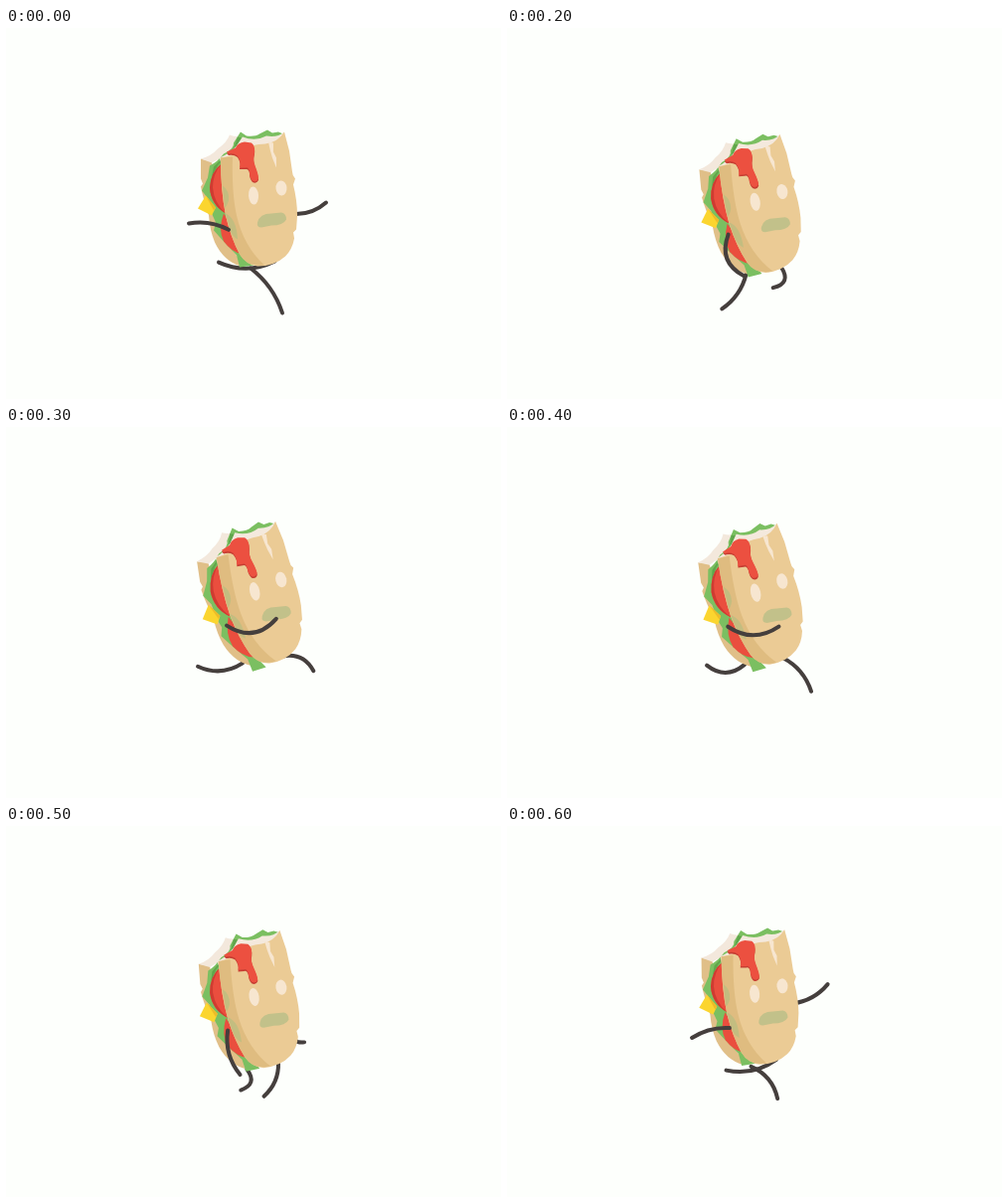
Write an HTML page with a canvas that moves like this. It is 498x373 px and loops after 0.65 s.

```html
<!DOCTYPE html>
<html lang="en">
<head>
<meta charset="utf-8">
<title>Running sandwich</title>
<style>
  html, body { margin: 0; width: 100%; height: 100%; overflow: hidden; background: #fdfffc; }
  canvas { display: block; width: 498px; height: 373px; }
</style>
</head>
<body>
<canvas id="stage" width="498" height="373"></canvas>
<script>
const ctx = document.getElementById('stage').getContext('2d');
const LOOP = 650, STEP = 50;
const PIVOT = { x: 245, y: 163 };

const SHAPES = {
  backBread: 'M196 133L207 136L214 190Q222 226 242 239L236 241Q219 236 210 217Q205 205 204 190Q198 172 196 161L198 158L196 153Z',
  backTop: 'M196 133Q207 130 213 123Q222 117 225 109Q232 112 239 110L231 125L207 137Z',
  lettuce: 'M236 106L242 110Q251 111 255 108L263 104L268 107L274 106L279 108L265 125L232 140L236 223L249 240L235 242L232 230L217 214L209 205L211 197L207 188L204 174L197 165L203 152L205 140Q213 136 219 128Q230 123 229 117Z',
  lettuceShade: 'M233 111L237 112L231 122L220 131L213 140L207 151L209 141Q222 128 229 123Z',
  cheese: 'M193 183L201 170L211 182L207 190Z',
  cheeseShade: 'M201 170L211 182L209 185Z',
  tomatoTop: 'M217 138Q206 146 205 162Q206 179 221 188Z',
  tomatoTopShade: 'M217 138Q206 146 205 162Q206 179 221 188Q209 177 208 162Q208 148 217 138Z',
  tomatoLow: 'M219 188Q213 204 219 216Q227 227 238 229L227 201Z',
  frontTop: 'M215 132Q226 127 232 120L238 111Q251 116 262 110Q273 112 280 106L284 124L217 141Z',
  face: 'M216 132Q229 130 236 125Q247 118 261 118Q274 116 280 106L285 125L288 146Q288 150 291 153L289 159Q293 175 293 190L292 204L289 207L290 213Q288 224 281 231Q270 241 253 241Q242 240 235 229Q226 212 221 190Q216 165 216 132Z',
  faceSide: 'M216 132L228 131Q227 168 232 190Q239 221 260 240Q242 242 235 229Q226 212 221 190Q216 165 216 132Z',
  moldTop: 'M218 160Q225 165 224 175Q222 181 220 182Z',
  moldLow: 'M221 188Q232 193 233 214Q227 211 225 203Z',
  mouth: 'M253 197Q255 188 267 188L277 187Q282 188 282 194Q279 200 267 200L257 202Q252 202 253 197Z',
  crack: 'M264 116L269 117L269 126L272 132L272 142L268 132L266 125Z',
  sauce: 'M222 126L231 122Q233 117 240 116L247 117Q251 120 250 127Q248 134 251 141Q254 149 254 153Q252 157 248 155Q245 152 245 146Q244 141 241 142L235 142Q237 136 233 130Q229 127 224 128Z'
};
for (const name in SHAPES) SHAPES[name] = new Path2D(SHAPES[name]);

// mean plus cosine and sine parts of the first, second, ... harmonic
function wave(phase, mean, ...parts) {
  return parts.reduce((sum, amp, i) => {
    const angle = phase * (1 + (i >> 1));
    return sum + amp * (i % 2 ? Math.sin(angle) : Math.cos(angle));
  }, mean);
}

// arc from (ax, ay) to (bx, by) whose middle lies `bend` off the chord
function limb(ax, ay, bx, by, bend) {
  const dx = bx - ax, dy = by - ay, k = 2 * bend / Math.hypot(dx, dy);
  ctx.beginPath();
  ctx.moveTo(ax, ay);
  ctx.quadraticCurveTo((ax + bx) / 2 - dy * k, (ay + by) / 2 + dx * k, bx, by);
  ctx.stroke();
}

function farArm(p) {
  const x = wave(p, 287, 40, -3, -5, -2);
  const y = Math.min(222, wave(p, 214, -33, -10, -5.5, 33));
  limb(287, 99 + y / 2, x, y, 4);
}

function nearArm(p, bob) {
  const x = wave(p, 228, -50, -12, 0, 0, 6, 4);
  const y = wave(p, 218, 3.5, 0, -29, -12, 4, 2);
  limb(wave(p, 223, 1), 204 + bob * .8, x, y, wave(p, 7, -3.5, 1.5));
}

function farLeg(p, bob) {
  const x = wave(p, 261, -50, -8, 3, 2);
  const y = wave(p, 254, -7.4, -8.2, -13, 0, 2, -1.5);
  limb(wave(p, 274.5, -4), 236 + bob, x, y, wave(p, -6.2, -.5, -2));
}

function nearLeg(p, bob) {
  const x = wave(p, 233, 43, 0, 2);
  const y = wave(p, 268, 23, 15, -8.5, 0, 4, 3);
  limb(wave(p, 242, 4), 243 + bob, x, y, wave(p, -5.5, 1.2, 2));
}

function fill(name, color) {
  ctx.fillStyle = color;
  ctx.fill(SHAPES[name]);
}

// run a drawing inside its own transform
function within(change, paint) {
  ctx.save();
  change();
  paint();
  ctx.restore();
}

function stretch(y, factor) {
  ctx.translate(0, y);
  ctx.scale(1, factor);
  ctx.translate(0, -y);
}

function turn(x, y, angle) {
  ctx.translate(x, y);
  ctx.rotate(angle);
  ctx.translate(-x, -y);
}

function eye(x, y, rx, ry) {
  ctx.beginPath();
  ctx.ellipse(x, y, rx, ry, -.08, 0, 2 * Math.PI);
  ctx.fill();
}

function filling(sag) {
  within(() => stretch(104, 1 + sag / 270), () => {
    fill('lettuce', '#7bbf61');
    fill('lettuceShade', '#60a64c');
    fill('tomatoTop', '#ea4e3e');
    fill('tomatoTopShade', '#cf3b31');
    fill('tomatoLow', '#ea4e3e');
  });
  within(() => ctx.translate(0, sag * .75), () => {
    fill('cheese', '#fbd52f');
    fill('cheeseShade', '#ecbb29');
  });
}

function face(tilt) {
  fill('frontTop', '#f4e9dd');
  fill('face', '#ebcb95');
  fill('faceSide', '#dfbc80');
  fill('moldTop', '#c3bd80');
  fill('moldLow', '#c3bd80');
  fill('crack', '#f7e6d0');
  within(() => turn(267, 194, -tilt), () => fill('mouth', '#c2c18a'));
  eye(249, 170, 5, 9);
  eye(277, 162.5, 5.5, 7.5);
  within(() => ctx.translate(0, 1.6), () => fill('sauce', '#c73d32'));
  fill('sauce', '#ec5040');
}

function sandwich(p, bob) {
  const lean = (1 - Math.cos(p - .145)) / 2;
  const tilt = -.154 * lean, sag = 9 * lean * lean;
  within(() => {
    ctx.translate(0, bob);
    turn(PIVOT.x, PIVOT.y, tilt);
    stretch(130, 1 + sag / 220);
  }, () => {
    fill('backBread', '#e0bf88');
    fill('backTop', '#f3e8dc');
    filling(sag);
    face(tilt);
  });
}

function draw(t) {
  const p = 2 * Math.PI * t / LOOP;
  const bob = wave(p, 0, 2.6, 2.5, -4.1);
  ctx.fillStyle = '#fdfffc';
  ctx.fillRect(0, 0, 498, 373);
  ctx.strokeStyle = '#453f3d';
  ctx.lineWidth = 4;
  ctx.lineCap = 'round';
  farArm(p);
  farLeg(p, bob);
  nearLeg(p, bob);
  sandwich(p, bob);
  nearArm(p, bob);
}

const start = performance.now();
function tick() {
  const t = (performance.now() - start) % LOOP;
  draw(Math.floor(t / STEP) * STEP);
  requestAnimationFrame(tick);
}
tick();
</script>
</body>
</html>
```
